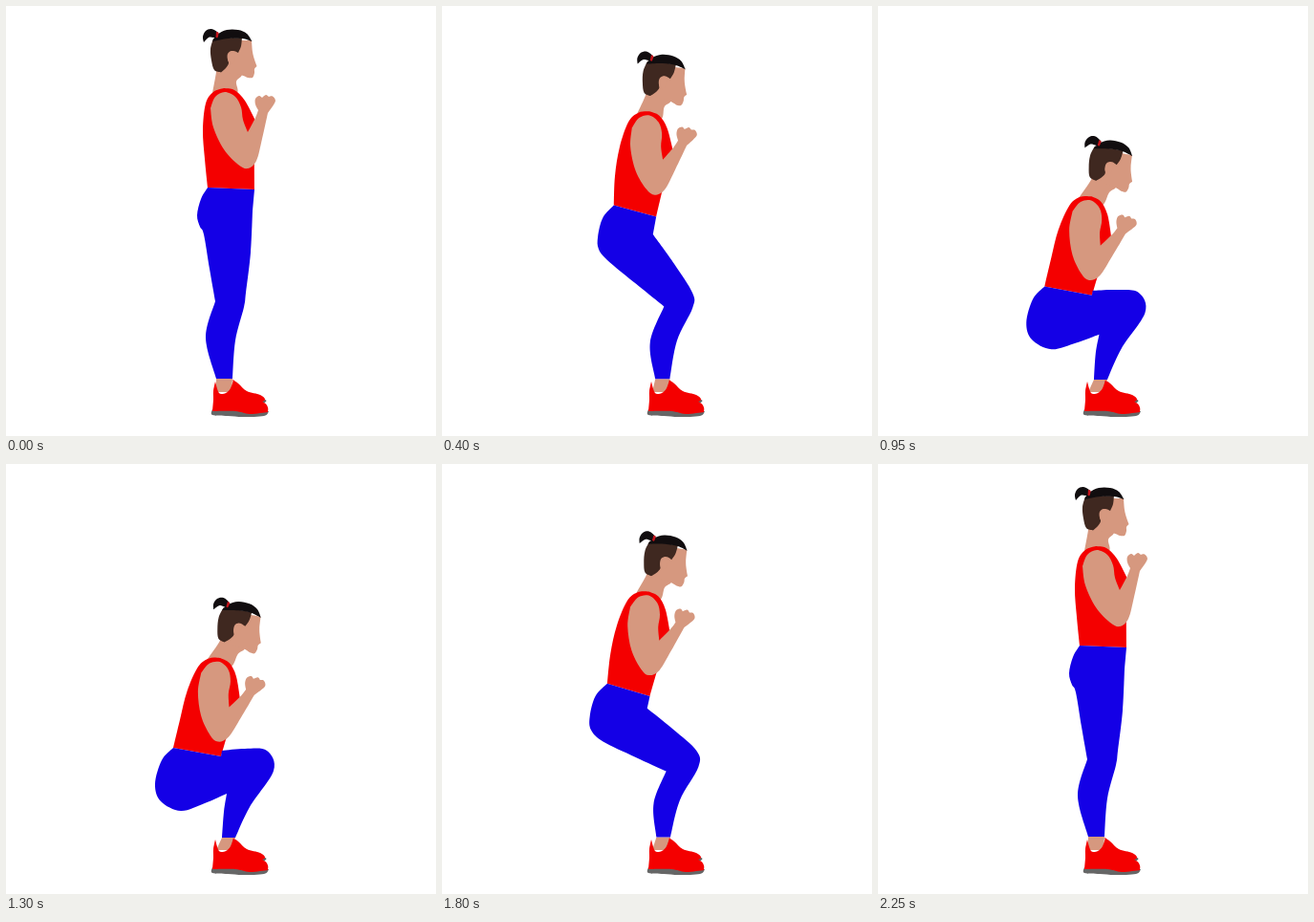
Write an HTML page with a canvas that moves like this. It is 450x450 px and loops after 2300 ms.

```html
<!DOCTYPE html>
<html lang="en">
<head>
<meta charset="utf-8">
<title>Squat</title>
<style>
html, body { margin: 0; width: 100%; height: 100%; overflow: hidden; background: #fff; }
canvas { display: block; }
</style>
</head>
<body>
<canvas id="stage" width="450" height="450"></canvas>
<script>
const ctx = document.getElementById('stage').getContext('2d');
const LOOP = 2300, STEP = 50, DOWN = 1060, UP = 900, STANDING = 2250;
const SKIN = '#d6987f', RED = '#f40000', BLUE = '#1400e6';
const BROWN = '#3f2820', BLACK = '#110d0f', SOLE = '#666', TIE = '#c4121a';

const ease = u => Math.sin(Math.min(Math.max(u, 0), 1) * Math.PI / 2) ** 1.5;
const bendAt = t => t < 1200 ? ease(t / DOWN) : ease((STANDING - t) / UP);

// The thigh turns a quarter circle; every moving part rides an elliptical arc with it
let swing = 0, drop = 0;
const arc = (start, out, fold) => start + out * swing + fold * drop;
const arcPoint = (x, y, ox, oy, fx, fy) => [arc(x, ox, fx), arc(y, oy, fy)];

// Rigid part: moves its pivot to a place and turns around it
function placer(px, py, [x, y], degrees) {
  const a = degrees * Math.PI / 180, c = Math.cos(a), s = Math.sin(a);
  return (...pts) => pts.map(([u, v]) =>
    [x + (u - px) * c - (v - py) * s, y + (u - px) * s + (v - py) * c]);
}

// Smooth curve inside each run, corners where runs meet
function shape(color, ...runs) {
  ctx.beginPath();
  for (const r of runs) {
    ctx.lineTo(...r[0]);
    for (let i = 0; i < r.length - 1; i++) {
      const a = r[i - 1] || r[i], b = r[i], c = r[i + 1], d = r[i + 2] || c;
      ctx.bezierCurveTo(
        b[0] + (c[0] - a[0]) / 6, b[1] + (c[1] - a[1]) / 6,
        c[0] - (d[0] - b[0]) / 6, c[1] - (d[1] - b[1]) / 6, c[0], c[1]);
    }
  }
  ctx.closePath();
  ctx.fillStyle = color;
  ctx.fill();
}

function drawFeet(heel, instep) {
  shape(SOLE, [[250, 412], [271, 412], [269, 416], [255, 419]]);
  shape(RED, [[237, 391], [243, 395], [252, 403], [266, 407], [271, 412], [264, 415], [250, 415]]);
  shape(SKIN, [heel], [[220, 404]], [[236, 404]], [instep]);
  shape(SOLE, [[216, 422], [216, 428], [232, 429], [248, 430], [270, 429], [275, 424]]);
  shape(RED,
    [[219, 393], [223, 405], [230, 405], [235, 400], [238, 391]],
    [[238, 391], [245, 403], [256, 409], [270, 415], [274, 420], [274, 425]],
    [[274, 425], [255, 427], [240, 424], [216, 424]],
    [[216, 424], [217, 412], [217, 403], [219, 393]]);
}

function drawLeg(waistBack, waistFront, heel, instep) {
  const kneeBack = arcPoint(219, 309, 27, -5, -15, 41);
  const hipFront = arcPoint(258, 215, -76, 16, 44, 69);
  shape(BLUE,
    [waistBack,
      arcPoint(204, 202, -68, -6, 27, 114),
      arcPoint(200, 219, -69, -4, 25, 120),
      arcPoint(203, 231, -76, -5, 35, 127),
      arcPoint(207, 239, -72, 3, 48, 121),
      arcPoint(213, 275, -22, -2, 17, 82),
      kneeBack],
    [kneeBack, arcPoint(209, 347, 12, 4, 7, 13), heel],
    [instep,
      arcPoint(240, 350, 7, -4, 8, 13),
      arcPoint(249, 315, 17, -1, 14, 7),
      arcPoint(251, 300, 16, 0, 6, 0),
      arcPoint(256, 258, -29, 9, 23, 31),
      hipFront],
    [hipFront, waistFront]);
}

function drawHead(head, body) {
  shape(SKIN,
    [...head([220, 60], [220, 69]), ...body([216, 91])],
    [...body([228, 96], [242, 91]), ...head([241, 79], [247, 72], [246, 60])]);
  shape(SKIN,
    head([225, 36], [257, 36]),
    head([257, 36], [258, 48], [260, 56], [262.5, 63]),
    head([262.5, 63], [260, 66], [260, 70], [258, 75], [253, 75]),
    head([253, 75], [245, 72], [232, 70], [226, 62]));
  shape(BROWN,
    head([217, 34], [247, 33]),
    head([247, 33], [246, 42], [243, 49]),
    head([243, 49], [238, 47], [234, 49], [232, 55], [233, 60], [230, 65], [225, 69.5]),
    head([225, 69.5], [218, 67], [215, 57], [214, 45], [217, 34]));
  shape(SKIN, head([240, 49], [236, 47], [232, 50], [232, 56], [235, 61], [239, 58]));
  shape(BLACK,
    head([216, 37], [221, 30], [231, 25], [243, 25], [252, 29], [257.5, 37]),
    head([257.5, 37], [247, 34], [233, 34], [216, 37]));
  shape(BLACK,
    head([207, 38], [206, 32], [209, 26], [215, 24], [222, 28], [223, 34]),
    head([223, 34], [217, 33], [212, 33], [207, 38]));
  shape(TIE, head([220, 27], [222.5, 28], [221.5, 33], [219.5, 32.5]));
}

function drawShirt(body, waistBack, waistFront) {
  shape(RED,
    [waistBack, ...body([208, 160], [206, 130], [209, 102], [217, 90], [228, 86])],
    body([228, 86], [239, 88], [250, 99], [262, 122]),
    [...body([262, 122], [260, 150]), waistFront]);
}

function drawArm(body) {
  shape(SKIN,
    body([214, 107], [219, 95], [229, 90], [240, 95], [246, 106], [248, 119], [253, 132]),
    body([253, 132], [261, 117], [264, 109]),
    body([264, 109], [261, 103], [261, 97], [265, 94], [268, 96]),
    body([268, 96], [272, 93], [275, 95]),
    body([275, 95], [279, 94.5], [282, 99], [279, 105], [274, 112]),
    body([274, 112], [268, 139], [262, 162], [253, 170], [243, 166], [228, 150], [217, 127], [214, 107]));
}

function draw(t) {
  const thigh = bendAt(t) * Math.PI / 2;
  swing = Math.sin(thigh);
  drop = 1 - Math.cos(thigh);

  const waistBack = arcPoint(211, 190, -59, -9, 23, 116);
  const waistFront = arcPoint(260, 192, -71, 12, 36, 102);
  const heel = arcPoint(220, 390, 5, 0, 1, 1), instep = arcPoint(237, 390, 2, 0, 1, 1);
  const body = placer(228, 86, arcPoint(228, 86, -25, 0, 21, 117), arc(0, 23, -5));
  const head = placer(232, 36, arcPoint(232, 36, -11, 3, 21, 116), arc(0, 14, -3));

  ctx.fillStyle = '#fff';
  ctx.fillRect(0, 0, 450, 450);
  drawFeet(heel, instep);
  drawHead(head, body);
  drawShirt(body, waistBack, waistFront);
  drawLeg(waistBack, waistFront, heel, instep);
  drawArm(body);
}

const start = performance.now();
function tick() {
  const t = (performance.now() - start) % LOOP;
  draw(Math.floor(t / STEP) * STEP);
  requestAnimationFrame(tick);
}
tick();
</script>
</body>
</html>
```
